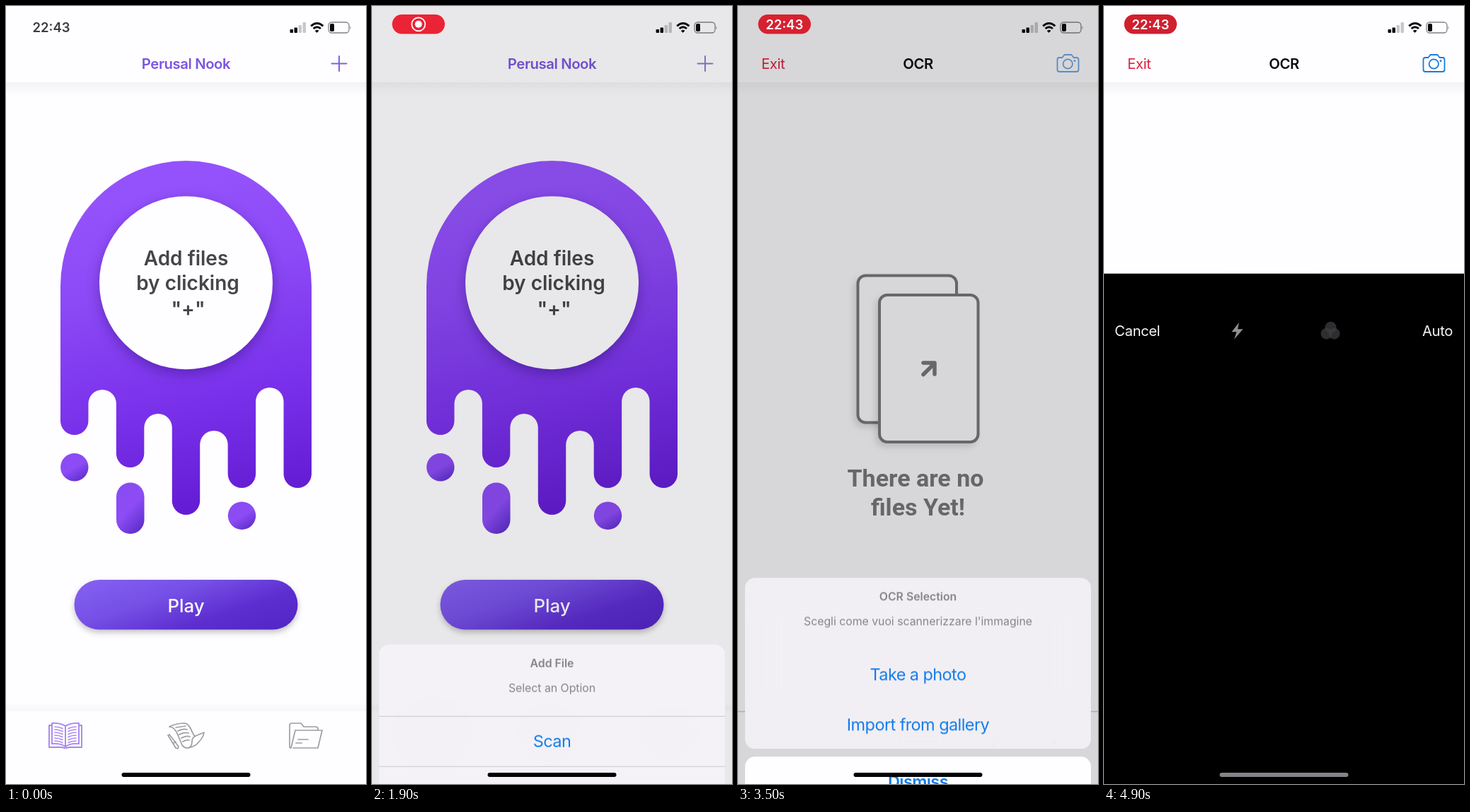
Recreate the animation shown at these times as an HTML page. Size 509 px wide and 1101 px high, loop 5 s.

```html
<!DOCTYPE html>
<html lang="en">
<head>
<meta charset="utf-8">
<title>Document scanner walkthrough</title>
<style>
  html, body { margin: 0; width: 100%; height: 100%; overflow: hidden; background: #fefdff; }
  body { font-family: Inter, sans-serif; }
  #stage { position: absolute; left: 0; top: 0; width: 509px; height: 1101px; overflow: hidden; }
  svg, #dim { position: absolute; left: 0; top: 0; width: 509px; height: 1101px; }
  #dim { background: #000; }
  .nav { font-size: 20.3px; letter-spacing: -.02em; }
  .bold { font-weight: 600; }
  .mid { text-anchor: middle; }
  .line { fill: none; stroke-linecap: round; stroke-linejoin: round; }

  .sheet { position: absolute; left: 10px; width: 489px; text-align: center; }
  .panel { position: relative; border-radius: 14px; overflow: hidden;
    background: rgba(246, 244, 248, .857);
    -webkit-backdrop-filter: blur(26px) saturate(1.3); backdrop-filter: blur(26px) saturate(1.3); }
  .head { height: 101.2px; color: #858388; font-size: 15.8px; position: relative; }
  .head div { position: absolute; width: 100%; line-height: 20px; }
  .head .title { top: 17px; font-weight: 600; }
  .head .note { top: 51.5px; }
  .row { height: 70.6px; line-height: 71px; position: relative; color: #107bea;
    font-size: 23.5px; letter-spacing: -.025em; }
  .row i { position: absolute; left: 0; top: 0; width: 100%; height: 1.2px; background: #c9c7cb; }
  .cancel { margin-top: 10.3px; height: 69.5px; border-radius: 14px; background: #fefdff; font-weight: 600; }
</style>
</head>
<body>
<div id="stage">
  <svg viewBox="0 0 509 1101">
    <defs>
      <linearGradient id="body" gradientUnits="userSpaceOnUse" x1="205" y1="260" x2="310" y2="725">
        <stop offset="0" stop-color="#9452fc"/><stop offset=".28" stop-color="#8c49f6"/>
        <stop offset=".65" stop-color="#7930ea"/><stop offset="1" stop-color="#611ad0"/>
      </linearGradient>
      <linearGradient id="drop" x1=".2" y1="0" x2=".8" y2="1">
        <stop offset="0" stop-color="#8a4bf2"/><stop offset=".5" stop-color="#8d4cf5"/><stop offset="1" stop-color="#5b2dca"/>
      </linearGradient>
      <linearGradient id="button" gradientUnits="userSpaceOnUse" x1="215" y1="765" x2="270" y2="925">
        <stop offset="0" stop-color="#8763f4"/><stop offset=".4" stop-color="#7650e6"/>
        <stop offset=".72" stop-color="#5c2dcf"/><stop offset="1" stop-color="#5326c6"/>
      </linearGradient>
      <linearGradient id="fall" x1="0" y1="0" x2="0" y2="1">
        <stop offset="0" stop-color="#000" stop-opacity=".045"/><stop offset="1" stop-color="#000" stop-opacity="0"/>
      </linearGradient>
      <linearGradient id="rise" x1="0" y1="1" x2="0" y2="0">
        <stop offset="0" stop-color="#000" stop-opacity=".03"/><stop offset="1" stop-color="#000" stop-opacity="0"/>
      </linearGradient>
    </defs>

    <g id="home">
      <rect width="509" height="1101" fill="#fefdff"/>
      <rect y="108" width="509" height="19" fill="url(#fall)"/>
      <rect y="985" width="509" height="13" fill="url(#rise)"/>
      <text class="nav bold mid" x="254.5" y="88.5" fill="#7b55df">Perusal Nook</text>
      <path id="plus" class="line" stroke-width="2" d="M460.5 81.5h21M471 71v21"/>
      <path id="blob" fill="url(#body)"/>
      <g fill="url(#drop)">
        <circle cx="96.8" cy="652.7" r="19.7"/>
        <rect x="156" y="674.5" width="39.5" height="72.5" rx="19.7"/>
        <circle cx="333.5" cy="721.3" r="19.7"/>
      </g>
      <circle cx="254.5" cy="391.7" r="122.5" fill="#fefdff" style="filter:drop-shadow(0 6px 9px rgba(20,0,70,.32))"/>
      <g class="bold mid" font-size="28" fill="#464549">
        <text x="254.5" y="367">Add files</text>
        <text x="257" y="402">by clicking</text>
        <text x="257.5" y="439">"+"</text>
      </g>
      <rect x="96.5" y="812" width="316" height="70.5" rx="35.2" fill="url(#button)" style="filter:drop-shadow(0 4px 4px rgba(0,0,0,.24))"/>
      <text class="mid" x="254.5" y="857.5" font-size="25.8" font-weight="500" fill="#fefdff">Play</text>

      <g class="line" stroke="#a887ee" stroke-width="1.9">
        <path d="M84 1019q-8-5-19-4v29q12-1 19 4q7-5 19-4v-29q-11-1-19 4zv29M64 1018h-3v31h18q5 2 10 0h18v-31h-3"/>
        <path id="lines" stroke-width="1.6"/>
      </g>
      <g class="line" stroke="#a09ea4" stroke-width="1.7">
        <path d="M231 1020q8 0 13 14l5 12q4 5 9 4q10-2 15-9q6-6 7-13l-12 5q-5 2-5 8q0 8-6 9M231 1020q9-5 22-5q6 1 11 14l3 5"/>
        <path d="M240 1021l14-2M243 1026q7-4 13-2M245 1031q7-4 13-2M248 1036q6-4 12-2M250 1041q5-3 9-2"/>
        <path d="M229 1032l2-1l13 17l-1 3l-3-1zM237 1043l3-2"/>
        <path d="M406 1050h35l6-25h-38l-6 25q-2 0-2-2v-30q0-3 3-3h13l4 5h17q3 0 3 3v2M413 1038h14M410 1043h8"/>
      </g>
    </g>

    <g id="ocr">
      <rect width="509" height="1101" fill="#fefdff"/>
      <rect y="108" width="509" height="19" fill="url(#fall)"/>
      <text class="nav" x="33" y="88.5" fill="#dd2440">Exit</text>
      <text class="nav bold mid" x="254.5" y="88.5" fill="#0b0a0d">OCR</text>
      <g id="camera" class="line" stroke="#1a7ad9" stroke-width="1.8">
        <path d="M454.500 73h4l3-4h10l3 4h4q3 0 3 3v14q0 3-3 3h-24q-3 0-3-3v-14q0-3 3-3z"/>
        <circle cx="466.300" cy="82" r="6.700"/><circle cx="476" cy="77.500" r=".6"/>
      </g>
      <g stroke="#7a797c" stroke-width="4" fill="#fefdff">
        <g style="filter:drop-shadow(-4px 5px 5px rgba(0,0,0,.13))">
          <rect x="169.500" y="381.500" width="139.500" height="208" rx="11"/>
        </g>
        <g style="filter:drop-shadow(-4px 5px 5px rgba(0,0,0,.13))">
          <rect x="200" y="409" width="139.500" height="208" rx="11"/>
        </g>
        <path class="line" stroke-width="5.500" d="M262 521.500l15.500-15.500M262 505h16v16"/>
      </g>
      <g class="mid" font-family="Roboto, sans-serif" font-weight="700" font-size="34" fill="#7a797c">
        <text x="251" y="680">There are no</text>
        <text x="254.500" y="721">files Yet!</text>
      </g>
      <path d="M0 998.500h509" stroke="#cbc9cd" stroke-width="1.300"/>
      <g class="line" stroke="#d2d0d4" stroke-width="1.700">
        <path d="M99 1032h-35l16-17m-16 17l16 17M150 1032h35l-16-17m16 17l-16 17"/>
        <rect x="229.500" y="1015" width="50.500" height="34" rx="2"/>
        <path stroke-width="3.500" d="M246 1017h17M237 1028h36M237 1034h36M237 1040h36"/>
        <g stroke-dasharray="5 4">
          <rect x="317" y="1015" width="49" height="33" rx="3"/>
          <rect x="404" y="1015" width="48" height="32" rx="3"/>
        </g>
        <path stroke="#fefdff" stroke-width="9" d="M361 1045h1M446 1044h2"/>
        <path stroke-width="2.500" stroke="#c2c0c4" d="M358.500 1042l6 6m0-6l-6 6M442 1044h10m-5-5v10"/>
      </g>
    </g>

    <g id="shot">
      <rect width="509" height="1101" fill="#000"/>
      <text class="nav" x="15" y="88" fill="#f3f2f4">Cancel</text>
      <text class="nav" x="493" y="88" text-anchor="end" fill="#f3f2f4">Auto</text>
      <path d="M191 69l-10.500 13.500h7l-3.500 10.500l12.500-14.500h-7.500z" fill="#918f94"/>
      <g fill="#3d3c3f" fill-opacity=".75">
        <circle cx="320.500" cy="76" r="8"/><circle cx="314.500" cy="85" r="8"/><circle cx="325.500" cy="85" r="8"/>
      </g>
    </g>
  </svg>

  <div id="dim"></div>
  <div id="addSheet" class="sheet"></div>
  <div id="ocrSheet" class="sheet"></div>

  <svg viewBox="0 0 509 1101">
    <text id="clock" class="bold" x="37.500" y="37" font-size="18.500" fill="#3d3c40">22:43</text>
    <g id="pill">
      <rect id="pillBack" x="28.500" y="12" width="74.500" height="27.500" rx="13.700"/>
      <g id="record">
        <circle cx="65.700" cy="25.800" r="9.500" fill="none" stroke="#fff" stroke-width="1.800"/>
        <circle cx="65.700" cy="25.800" r="5" fill="#fff"/>
      </g>
      <text id="pillClock" class="bold mid" x="65.700" y="32.500" font-size="18.500" fill="#fff">22:43</text>
    </g>
    <g fill="#0a0a0c">
      <rect x="401.500" y="33" width="4.500" height="5" rx="1"/>
      <rect x="407.500" y="30.500" width="4.500" height="7.500" rx="1"/>
      <rect x="413.500" y="27" width="4.500" height="11" rx="1" opacity=".22"/>
      <rect x="419.500" y="23" width="4.500" height="15" rx="1" opacity=".22"/>
      <rect x="458" y="25" width="6" height="11" rx="1.800"/>
      <path d="M486.500 28.500q2 2 0 4.500z" opacity=".5"/>
    </g>
    <g class="line" stroke="#0a0a0c">
      <path stroke-width="3" stroke-linecap="butt" d="M431.200 28.300q8.600-7.600 17.200 0M434.600 32q5.200-4.600 10.400 0"/>
      <path d="M437.600 35q2.200-1.700 4.400 0l-2.200 2.200z" fill="#0a0a0c"/>
      <rect x="456" y="23" width="29" height="15" rx="4.500" stroke-width="1.300" opacity=".5"/>
    </g>
    <rect id="bar" x="163.500" y="1085" width="182" height="6" rx="3"/>
  </svg>
</div>

<script>
const LOOP = 5000, STEP = 100, H = 1101;
const $ = id => document.getElementById(id);
const clamp = v => Math.max(0, Math.min(1, v));
const ramp = (t, from, to) => clamp((t - from) / (to - from));
const mix = (a, b, k) => `rgb(${a.map((v, i) => Math.round(v + (b[i] - v) * k))})`;

// Critically damped spring, 0 to 1
const spring = ms => {
  const x = Math.max(0, ms) * 0.0165;
  return 1 - (1 + x) * Math.exp(-x);
};

function blobPath() {
  const left = 77, col = 355 / 9, r = col / 2;
  const tips = [607, 543, 653, 577, 720, 601, 682, 540, 682];
  let d = `M432 396.500A177.500 177.500 0 0 0 77 396.500`;
  tips.forEach((y, i) => {
    const drip = i % 2 === 0, edge = drip ? y - r : y + r;
    d += `V${edge}A${r} ${r} 0 0 ${drip ? 0 : 1} ${left + col * (i + 1)} ${edge}`;
  });
  return d + 'Z';
}

function bookLines() {
  let d = '';
  for (let y = 1020; y < 1042; y += 4) d += `M69 ${y}q6 0 11 2.500M99 ${y}q-6 0-11 2.500`;
  return d;
}

function makeSheet(id, top, open, close, [title, note, cancel, ...rows]) {
  const el = $(id);
  el.style.top = top + 'px';
  el.innerHTML = `<div class="panel"><div class="head"><div class="title">${title}</div><div class="note">${note}</div></div>` +
    rows.map(r => `<div class="row"><i></i>${r}</div>`).join('') +
    `</div><div class="row cancel">${cancel}</div>`;
  const rules = el.querySelectorAll('i');
  return t => {
    const shown = t < close ? spring(t - open) : 1 - spring(t - close);
    const visible = t > open && t < close + 440;
    el.style.display = visible ? '' : 'none';
    el.style.transform = `translateY(${(1 - shown) * (H - top)}px)`;
    rules.forEach(r => r.style.opacity = ramp(t, open + 430, open + 580));
    return visible ? shown : 0;
  };
}

$('blob').setAttribute('d', blobPath());
$('lines').setAttribute('d', bookLines());

const addSheet = makeSheet('addSheet', 666, 700, 1789,
  ['Add File', 'Select an Option', 'Cancel', 'Scan', 'Import File', 'Write Text']);
const ocrSheet = makeSheet('ocrSheet', 737, 3318, 4320,
  ['OCR Selection', "Scegli come vuoi scannerizzare l'immagine", 'Dismiss', 'Take a photo', 'Import from gallery']);

function slidePage(id, t, start) {
  $(id).style.display = t > start ? '' : 'none';
  $(id).setAttribute('transform', `translate(0 ${(1 - spring(t - start)) * H})`);
}

function draw(t) {
  const add = addSheet(t), ocr = ocrSheet(t);
  $('dim').style.opacity = 0.19 * Math.max(add, ocr);
  $('plus').setAttribute('stroke', mix([128, 96, 224], [158, 150, 168], add));
  slidePage('ocr', t, 2242);
  slidePage('shot', t, 4764);
  $('camera').setAttribute('opacity', t < 3250 ? 1 : 0.3 + 0.7 * ramp(t, 3350, 3650));

  const pill = ramp(t, 100, 400), time = ramp(t, 2950, 3250);
  $('clock').setAttribute('opacity', 1 - pill);
  $('pill').setAttribute('opacity', pill);
  $('record').setAttribute('opacity', 1 - time);
  $('pillClock').setAttribute('opacity', time);
  const pulse = 0.5 + 0.5 * Math.cos((t - 1900) / 1200 * 2 * Math.PI);
  $('pillBack').setAttribute('fill', mix([208, 32, 46], [234, 36, 54], pulse));
  $('bar').setAttribute('fill', t > 4800 ? '#858388' : '#000');
}

const begin = performance.now();
function tick() {
  const t = (performance.now() - begin) % LOOP;
  draw(Math.floor(t / STEP) * STEP);
  requestAnimationFrame(tick);
}
draw(0);
requestAnimationFrame(tick);
</script>
</body>
</html>
```
